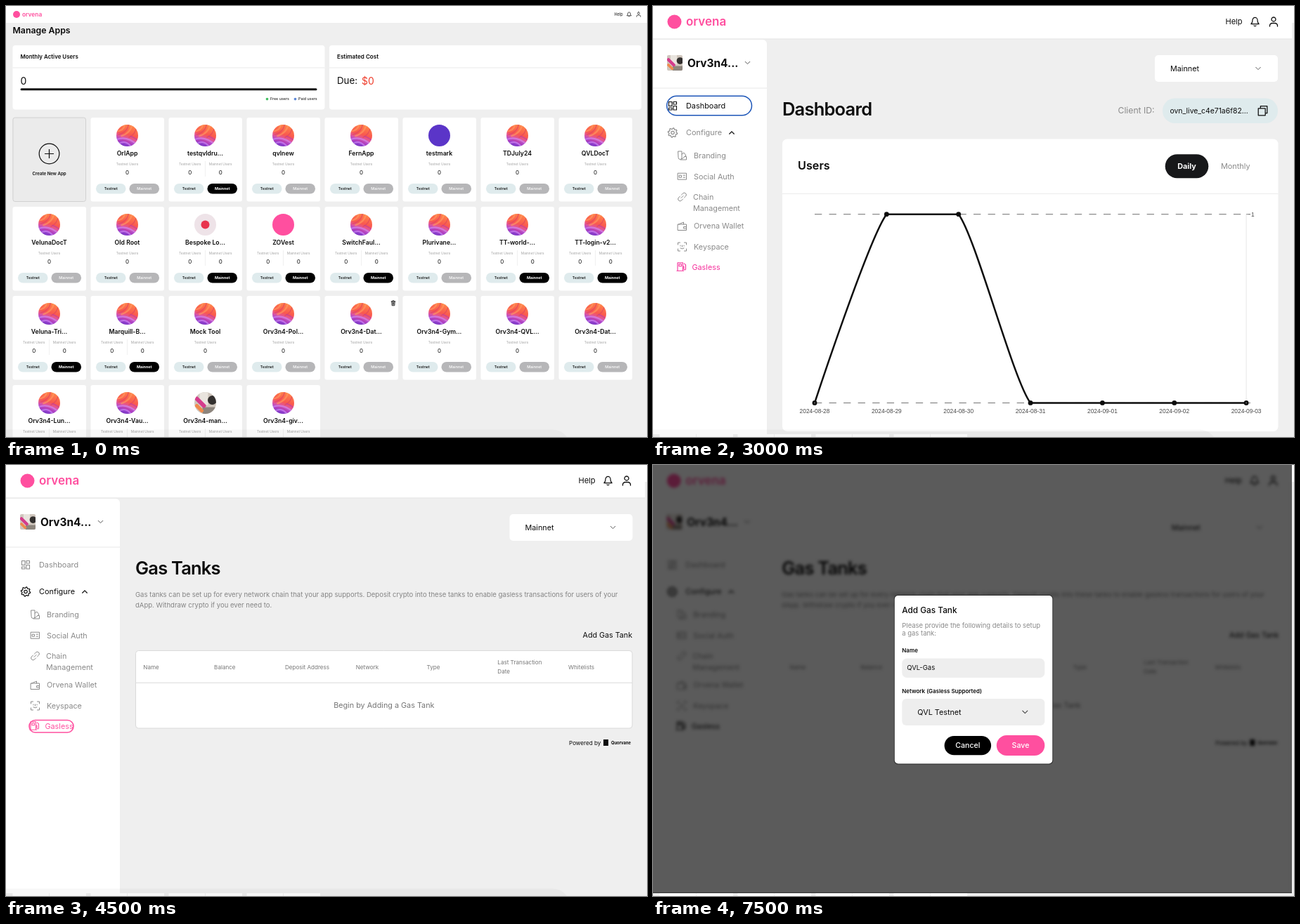
An HTML page with a canvas that plays this animation: 912 px wide and 614 px high, repeating every 8000 ms.

```html
<!DOCTYPE html>
<html lang="en">
<head>
<meta charset="utf-8">
<title>Gas tank setup</title>
<style>
  html, body { margin: 0; width: 100%; height: 100%; overflow: hidden; background: #efefef; }
  canvas { display: block; width: 912px; height: 614px; }
</style>
</head>
<body>
<canvas id="stage"></canvas>
<script>
const W = 912, H = 614, LOOP = 8000, STEP = 1500;
const PINK = '#ff4f9f', GRAY = '#8a8a8a', BLACK = '#0c0c0c', MIST = '#dfebed', BG = '#efefef';
const FONT = 'Inter, "Open Sans", sans-serif';
const canvas = document.getElementById('stage');
const ctx = canvas.getContext('2d');
const dpr = window.devicePixelRatio || 1;
canvas.width = W * dpr;
canvas.height = H * dpr;

const ICONS = {
  grid: 'M-5.5-5.5h4.5v6h-4.5zM1-5.5h4.5v3.5h-4.5zM-5.5 3h4.5v3h-4.5zM1 .5h4.5v5.5h-4.5z',
  swatch: 'M-5.5-6h5v9a2.5 2.5 0 0 1-5 0zM-.5-2l3-2 3 4-6 5M-2.5 6h8.5v-4.5h-2.5',
  card: 'M-6-4.5h12v9h-12zM-4-1.5h3v3h-3zM1.5-1.5h2.5M1.5 1.5h2.5',
  link: 'M-1.5 1.5l3-3M-1-3l2-2a2.8 2.8 0 0 1 4 4l-2 2M1 3l-2 2a2.8 2.8 0 0 1-4-4l2-2',
  wallet: 'M-6-2.5h12v8.5h-12zM-5-2.5l7-3v3M2.5 1h3.5v2.5h-3.5z',
  scan: 'M-6-3v-3h3M3-6h3v3M6 3v3h-3M-3 6h-3v-3M-2.5-2v1M2.5-2v1M0-2v2M-2.5 2q2.5 2 5 0',
  pump: 'M-5.5 6v-11.5h7.5v11.5M-6.5 6h9.5M-3.5-3.5h3.5v3h-3.5zM2 0h1.5v3.5a1 1 0 0 0 2.5 0v-6l-2-2',
  bell: 'M-5.5 3.5q2-1.5 2-5a3.5 4 0 0 1 7 0q0 3.5 2 5zM-1.5 5.8q1.5 1.5 3 0',
  user: 'M-5.5 6.5v-1a3.5 3.5 0 0 1 3.5-3.5h4a3.5 3.5 0 0 1 3.5 3.5v1M0-6.5a3 3 0 1 0 .01 0z',
  down: 'M-3.5-1.8l3.5 3.5 3.5-3.5',
  up: 'M-3.5 1.8l3.5-3.5 3.5 3.5',
  copy: 'M-6-3h9.5v9.5h-9.5zM-3-3v-3h9v9.5h-2.5',
  trash: 'M-4-3.5h8M-3-3.5l.5 8h5l.5-8M-1.5-3.5v-1.5h3v1.5M-1-1.5v4M1-1.5v4',
  gear: gearPath()
};

// A leading * marks an app that is live on Mainnet.
const APPS = ('OrlApp,*testqvldru...,qvlnew,FernApp,testmark,TDJuly24,QVLDocT,' +
  'VelunaDocT,Old Root,*Bespoke Lo...,*ZOVest,*SwitchFaul...,Plurivane...,*TT-world-...,*TT-login-v2...,' +
  '*Veluna-Tri...,*Marquill-B...,Mock Tool,Orv3n4-Pol...,Orv3n4-Dat...,Orv3n4-Gym...,Orv3n4-QVL...,Orv3n4-Dat...,' +
  '*Orv3n4-Lun...,*Orv3n4-Vau...,*Orv3n4-man...,*Orv3n4-giv...').split(',');
const FACES = { testmark: markFace('#5b35c8'), ZOVest: markFace(PINK),
  'Bespoke Lo...': badgeFace, 'Orv3n4-man...': photoFace };

function gearPath() {
  let d = '';
  for (let i = 0; i < 32; i++) {
    const a = (i + .5) * Math.PI / 16, r = i % 4 < 2 ? 6.7 : 5.2;
    d += (i ? 'L' : 'M') + (r * Math.cos(a)).toFixed(2) + ' ' + (r * Math.sin(a)).toFixed(2);
  }
  return d + 'zM2.2 0a2.2 2.2 0 1 0-4.4 0a2.2 2.2 0 1 0 4.4 0z';
}

// y is the middle of the capitals
function text(str, x, y, size, color = BLACK, weight = 400, align = 'left', family = FONT) {
  ctx.font = `${weight} ${size}px ${family}`;
  ctx.textAlign = align;
  ctx.fillStyle = color;
  ctx.fillText(str, x, y + size * .36);
}

// Page headings are set large with tight tracking
function heading(str, x, y) {
  ctx.letterSpacing = '-.8px';
  text(str, x, y, 25.5, BLACK, 600);
  ctx.letterSpacing = '0px';
}

function box(x, y, w, h, r, fill, stroke, line = 1) {
  ctx.beginPath();
  ctx.roundRect(x, y, w, h, r);
  if (fill) { ctx.fillStyle = fill; ctx.fill(); }
  if (stroke) { ctx.strokeStyle = stroke; ctx.lineWidth = line; ctx.stroke(); }
}

function disc(x, y, r, fill) {
  ctx.beginPath();
  ctx.arc(x, y, r, 0, Math.PI * 2);
  ctx.fillStyle = fill;
  ctx.fill();
}

function strokePath(d, color, width) {
  ctx.strokeStyle = color;
  ctx.lineWidth = width;
  ctx.stroke(new Path2D(d));
}

function icon(name, x, y, color = BLACK, scale = 1, width = 1) {
  ctx.save();
  ctx.translate(x, y);
  ctx.scale(scale, scale);
  ctx.lineJoin = ctx.lineCap = 'round';
  strokePath(ICONS[name], color, width);
  ctx.restore();
}

function clipped(x, y, r, draw) {
  ctx.save();
  ctx.beginPath();
  ctx.arc(x, y, r, 0, Math.PI * 2);
  ctx.clip();
  ctx.translate(x, y);
  draw();
  ctx.restore();
}

function markFace(color) {
  return (x, y) => disc(x, y, 15.5, color);
}

function badgeFace(x, y) {
  disc(x, y, 15.5, '#eee3e8');
  disc(x, y, 6, '#e8344e');
}

function photo() {
  box(-17, -17, 34, 34, 0, '#cfc6bd');
  ctx.fillStyle = '#e9e4de';
  ctx.fillRect(-8, -17, 12, 20);
  ctx.fillStyle = '#8d857d';
  ctx.fillRect(-4, 6, 22, 12);
  disc(10, -4, 6.5, '#33302f');
  ctx.lineCap = 'round';
  strokePath('M-12-6L-2 4', '#d43c8c', 6);
  strokePath('M-12 4L-5 11', '#f08a4c', 5);
}

function photoFace(x, y) {
  clipped(x, y, 15.5, photo);
}

function swirlFace(x, y) {
  clipped(x, y, 15.5, () => {
    const g = ctx.createLinearGradient(5, -15, -5, 15);
    [[0, '#ff8548'], [.45, '#f9584f'], [.62, '#e0569c'], [.8, '#a348d8'], [1, '#7a35c0']]
      .forEach(([at, c]) => g.addColorStop(at, c));
    box(-16, -16, 32, 32, 0, g);
    ctx.globalAlpha = .65;
    strokePath('M-16-6Q-4-6-3-18M-9 1Q6-4 7-17', '#ff9a62', 2.2);
    strokePath('M-13-1Q1-5 2-17M2 3Q12-2 13-12', '#e2485e', 1.8);
    strokePath('M-16 6Q0-1 16 15M-14 13Q-2 4 7 18', '#d68af0', 2);
    strokePath('M-16 9Q-1 2 11 18M4 1Q13 3 17 11', '#c03ba8', 1.6);
  });
}

function pill(label, x, y, w, fill, color, weight) {
  box(x, y, w, 14.5, 7.25, fill);
  text(label, x + w / 2, y + 7.2, 5.4, color, weight, 'center');
}

function appCard(entry, x, y) {
  const live = entry[0] === '*', name = entry.replace('*', '');
  box(x, y, 104.5, 119.5, 3, '#fff');
  (FACES[name] || swirlFace)(x + 52, y + 25.5);
  text(name, x + 52, y + 51, 8.7, BLACK, 600, 'center');
  const users = live ? [['Testnet', 30.2], ['Mainnet', 73.7]] : [['Testnet', 52]];
  for (const [net, dx] of users) {
    text(net + ' Users', x + dx, y + 66, 4.8, '#a3a3a3', 400, 'center');
    text('0', x + dx, y + 78, 8, BLACK, 400, 'center');
  }
  if (live) box(x + 51.7, y + 62, .6, 22, 0, '#e6e6e6');
  pill('Testnet', x + 7.5, y + 94, 42.5, MIST, BLACK, 500);
  pill('Mainnet', x + 55, y + 94, 42.5, live ? '#000' : '#b6b6b8', '#fff', live ? 700 : 500);
}

function drawHome() {
  box(0, 0, W, H, 0, BG);
  box(0, 0, W, 24, 0, '#fff');
  disc(15, 12, 5, PINK);
  text('orvena', 23, 11.8, 8.4, PINK, 600);
  text('Help', 865.5, 11.8, 5.5);
  icon('bell', 886.5, 11.7, BLACK, .52, 1.4);
  icon('user', 900, 12, BLACK, .5, 1.4);
  text('Manage Apps', 9.5, 35, 12.3, BLACK, 600);

  box(9.5, 56, 444, 91.5, 4, '#fff');
  box(460, 56, 444, 91.5, 4, '#fff');
  box(9.5, 87.6, 444, .8, 0, '#e9e9e9');
  box(460, 87.6, 444, .8, 0, '#e9e9e9');
  text('Monthly Active Users', 20.5, 72.5, 7.95, BLACK, 600);
  text('Estimated Cost', 471, 72.5, 8.1, BLACK, 600);
  text('0', 20.5, 106.5, 14);
  box(20.5, 117.2, 422, 3, 1.5, '#141414');
  disc(371.5, 132.6, 1.8, '#3fbf5f');
  text('Free users', 376, 132.5, 5.4);
  disc(411.5, 132.6, 1.8, '#5b86d6');
  text('Paid users', 416, 132.5, 5.4);
  text('Due:', 471, 106.5, 13.3);
  text('$0', 506, 106.5, 14, '#ee3d2c');

  box(9.9, 159, 103.6, 119.5, 3, '#ebebeb', '#c9c9c9', .8);
  ctx.beginPath();
  ctx.arc(61.5, 210.5, 14.3, 0, Math.PI * 2);
  ctx.strokeStyle = BLACK;
  ctx.lineWidth = 1.2;
  ctx.stroke();
  strokePath('M55 210.5h13M61.5 204v13', BLACK, 1.2);
  text('Create New App', 61.5, 239, 6.1, BLACK, 600, 'center');
  APPS.forEach((app, i) => {
    const cell = i + 1;
    appCard(app, 9.5 + cell % 8 * 111, 159 + Math.floor(cell / 8) * 127);
  });
  icon('trash', 551, 423.5, BLACK, .72, 1.2);
}

function dockShade() {
  box(0, 603.5, 802, 40, [0, 24, 0, 0], 'rgba(0,0,0,.03)');
}

// Header and sidebar shared by the dashboard and the gas tank screen
function drawFrame({ bg = BG, rule = '#e8e8e8', dash = GRAY, conf = GRAY, gas = GRAY }) {
  box(0, 0, 909, 610, 0, bg);
  box(0, 0, 909, 46.5, 0, '#fff');
  box(0, 46.5, 909, 1, 0, rule);
  disc(30.5, 22.5, 10, PINK);
  text('orvena', 47, 22, 17, PINK, 600);
  text('Help', 814.5, 22, 11);
  icon('bell', 856.5, 22, BLACK, 1.02, 1.2);
  icon('user', 883, 22.5, BLACK, 1, 1.3);

  box(0, 48, 162, 562, [0, 6, 0, 0], '#fff');
  ctx.save();
  ctx.beginPath();
  ctx.roundRect(20, 70, 22, 22, 2);
  ctx.clip();
  ctx.translate(31, 81);
  ctx.scale(.75, .75);
  photo();
  ctx.restore();
  text('Orv3n4...', 49, 81, 15.4, BLACK, 700);
  icon('down', 134.5, 81, '#555', .95);
  box(0, 116.5, 162, 1, 0, rule);

  icon('grid', 28, 142, dash, 1, 1.1);
  text('Dashboard', 47, 142, 10.9, dash);
  icon('gear', 28, 180.5, conf, 1, 1.2);
  text('Configure', 47, 180.5, 10.9, conf);
  icon('up', 112, 180.5, BLACK, .95, 1.3);
  [['swatch', 'Branding', 213], ['card', 'Social Auth', 242.7], ['link', 'Chain', 272],
   ['wallet', 'Orvena Wallet', 313.5], ['scan', 'Keyspace', 343]].forEach(([name, label, y]) => {
    icon(name, 41.5, y, GRAY);
    text(label, name === 'link' ? 57 : 58, y, 10.8, GRAY);
  });
  text('Management', 57, 288.5, 10.8, GRAY);
  icon('pump', 40.5, 371.3, gas, 1, 1.1);
  text('Gasless', 55.5, 372.2, 10.8, gas);
}

function netSelect(x) {
  box(x, 70, 175, 38, 5, '#fff');
  text('Mainnet', x + 22, 89, 10.8);
  icon('down', x + 147, 89, '#555', .95);
}

function drawChart() {
  const x0 = 230, dx = 102.35, top = 296.7, base = 565.4;
  const px = i => x0 + dx * i, ys = [base, top, top, base, base, base, base];
  box(px(6) - .5, top, 1, base - top, 0, '#e6e6e6');
  ctx.setLineDash([10.3, 10.25]);
  strokePath(`M${x0} ${top}H850M${x0} ${base}H850`, '#6e6e6e', 1);
  ctx.setLineDash([]);
  strokePath(`M844 ${top}h6`, '#8c8c8c', 1);

  // Spline handles: a short part of the chord between neighbouring points
  const bend = .12, hx = bend * dx * 2, hy = bend * (base - top);
  ctx.beginPath();
  ctx.moveTo(x0, base);
  ctx.bezierCurveTo(x0, base, px(1) - hx, top + hy, px(1), top);
  ctx.lineTo(px(2), top);
  ctx.bezierCurveTo(px(2) + hx, top + hy, px(3) - hx, base - hy, px(3), base);
  ctx.lineTo(px(6), base);
  ctx.strokeStyle = BLACK;
  ctx.lineWidth = 2.5;
  ctx.stroke();
  ys.forEach((y, i) => {
    disc(px(i), y, 3.4, BLACK);
    if (i % 6 === 0) disc(px(i), y, 1.1, '#555');
    const day = new Date(Date.UTC(2024, 7, 28 + i)).toISOString().slice(0, 10);
    text(day, px(i), 577.3, 8.4, '#4a4a4a', 400, 'center', '"Liberation Sans", sans-serif');
  });
  text('1', 851, top, 8.4, '#4a4a4a', 400, 'left', '"Liberation Sans", sans-serif');
}

function drawDashboard(focused) {
  drawFrame({ dash: BLACK, gas: focused ? '#f5309b' : GRAY });
  if (focused) box(19.7, 128.3, 120.8, 27.4, 13.7, null, '#1c55b8', 1.5);
  netSelect(714);
  heading('Dashboard', 184, 147);
  text('Client ID:', 661.5, 149, 12.2, GRAY);
  box(725, 131.5, 164, 35.5, 17.5, MIST);
  text('ovn_live_c4e71a6f82...', 735.5, 149, 10.4);
  icon('copy', 867.5, 149, BLACK, 1.05, 1.2);
  box(184, 189.5, 705.5, 416.5, 7, '#fff');
  box(184, 267, 705.5, 1, 0, '#ececec');
  text('Users', 206, 227.5, 16.2, BLACK, 600);
  box(728.7, 211.2, 61.6, 34, 17, '#17181a');
  text('Daily', 759.5, 228.3, 10.8, '#fff', 700, 'center');
  text('Monthly', 808, 228.3, 10.9, GRAY);
  drawChart();
}

function drawTanks(flat) {
  const rule = flat ? '#fff' : '#dadada';
  drawFrame(flat ? { bg: '#fff', rule, conf: BLACK, gas: BLACK } : { conf: BLACK, gas: PINK });
  if (!flat) box(33, 363.5, 63, 17.5, 8.7, null, PINK, 1.6);
  netSelect(716.5);
  heading('Gas Tanks', 184, 147);
  text('Gas tanks can be set up for every network chain that your app supports. Deposit crypto into ' +
    'these tanks to enable gasless transactions for users of your', 184, 185, 9.56, '#848484');
  text('dApp. Withdraw crypto if you ever need to.', 184, 199.2, 9.56, '#848484');
  text('Add Gas Tank', 891, 242, 10.7, BLACK, 400, 'right');
  box(184.5, 264.5, 706.5, 110.5, 4, '#fff', rule);
  box(184.5, 309.8, 706.5, 1, 0, rule);
  ['Name', 'Balance', 'Deposit Address', 'Network', 'Type', 'Last Transaction', 'Whitelists']
    .forEach((label, i) => text(label, 195.3 + 100.8 * i, i === 5 ? 281.5 : 287.6, 8.1, '#777'));
  text('Date', 699.3, 293.7, 8.1, '#777');
  text('Begin by Adding a Gas Tank', 537.8, 342.5, 10.8, '#757575', 400, 'center');
  text('Powered by', 801, 396, 8.1);
  box(850, 391, 7, 9, 0, BLACK);
  text('Quorvane', 861, 396, 5.8, BLACK, 700);
}

function drawModal(filled) {
  box(343.6, 185.1, 226.3, 241.3, 5.5, '#2c2c2c');
  box(344.5, 186, 224.5, 239.5, 5, '#fff');
  text('Add Gas Tank', 355, 206.5, 11.8, BLACK, 500);
  text('Please provide the following details to setup', 355, 228.5, 9.46, GRAY);
  text('a gas tank:', 355, 239.5, 9.46, GRAY);
  text('Name', 355, 264.3, 8, BLACK, 600);
  box(355, 275.5, 203, 27.5, 7, '#eee');
  text('Network (Gasless Supported)', 355, 322, 7.95, BLACK, 600);
  box(355, 333, 203, 38, 6, '#eee');
  icon('down', 530, 352, '#444', 1, 1.1);
  box(415.3, 386, 66.5, 27.3, 13.6, '#000');
  text('Cancel', 448.5, 399.6, 10.6, '#fff', 500, 'center');
  box(489.5, 385, 68.5, 29, 14.5, filled ? PINK : '#d0d0d0');
  text('Save', 523.7, 399.6, 10.6, '#fff', 500, 'center');
  if (filled) {
    text('QVL-Gas', 362, 289, 9.5);
    text('QVL Testnet', 377, 352, 10.8);
  }
}

function drawDialog(filled) {
  ctx.translate(filled ? -.7 : 0, 0);
  drawTanks(true);
  ctx.save();
  ctx.setTransform(1, 0, 0, 1, 0, 0);
  ctx.filter = `blur(${1.9 * dpr}px)`;
  ctx.drawImage(canvas, 0, 0);
  ctx.restore();
  box(-1, 0, 912, 610, 0, 'rgba(0,0,0,.645)');
  box(-1, 608.8, 912, 1.2, 0, '#3c3c3c');
  drawModal(filled);
}

const SCREENS = [null, () => drawDashboard(false), () => drawDashboard(true),
  () => drawTanks(false), () => drawDialog(false), () => drawDialog(true)];

function render(step) {
  ctx.setTransform(dpr, 0, 0, dpr, 0, 0);
  drawHome();
  if (step > 0) {
    ctx.save();
    ctx.beginPath();
    ctx.rect(0, 0, 909, 610);
    ctx.clip();
    SCREENS[step]();
    ctx.restore();
  }
  if (step < 4) dockShade();
}

let shown = -1, start = null;
function tick(now) {
  if (start === null) start = now;
  const step = Math.floor((now - start) % LOOP / STEP);
  if (step !== shown) render(shown = step);
  requestAnimationFrame(tick);
}
render(shown = 0);
requestAnimationFrame(tick);
</script>
</body>
</html>
```
